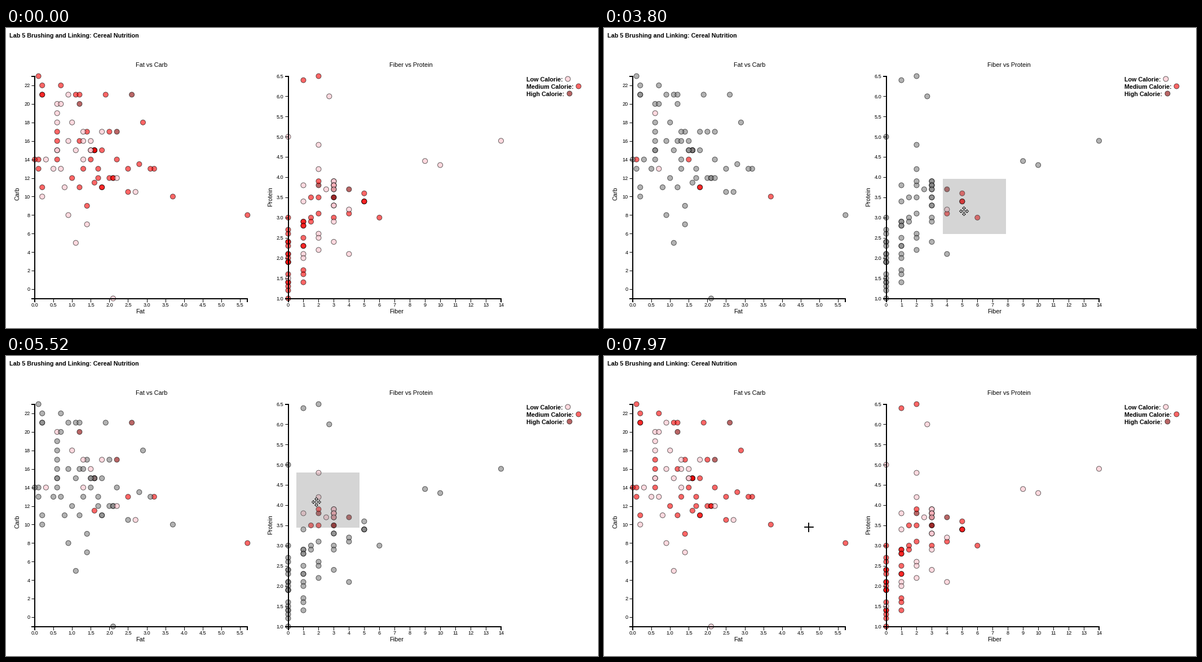
A matplotlib script for the animation above (8000 ms loop, 1050x533 px).

```python
import matplotlib.pyplot as plt
import numpy as np
from matplotlib.animation import FuncAnimation
from matplotlib.patches import Polygon, Rectangle

W, H, DPI = 1050, 533, 100
INTERVAL, LOOP = 40, 8000
PX = 72 / DPI
TOP, BOTTOM = 85.5, 480.5
LEFT_X = (51, 428.3)
RIGHT_X = (500.5, 878)

plt.rcParams["font.family"] = "Liberation Sans"

# fat, carb, fiber, protein
HIGH = [(2.6, 21, 2, 3.8), (1.2, 20, 3, 3.7), (2.2, 17, 3, 3.5),
        (1.6, 15, 4, 3.7), (1.6, 15, 3, 3.5)]
MEDIUM = [
    (2.5, 13, 2, 3.9), (3.2, 13, 1.5, 3.5), (1.6, 11.5, 2, 3.5), (5.7, 8, 3, 3.8),
    (.1, 14, 5, 3.6), (1.8, 11, 5, 3.4), (1.8, 11, 5, 3.4), (1.5, 14, 6, 3),
    (3.7, 10, 4, 3.1), (.6, 14, 2, 6.5), (2.2, 14, 1, 6.4), (2.8, 13.5, 3, 3),
    (.1, 13, 2, 3.1), (1.3, 13, 1.5, 3), (1.7, 13, 1.5, 2.9), (3.1, 13, 1, 2.9),
    (1, 12, 1, 2.9), (1.7, 12, 1, 2.8), (2, 12, 1, 2.8), (2.1, 12, 1, 2.5),
    (2.1, 12, 1, 2.3), (.2, 11, 1, 2.3), (1.2, 11, 1, 1.7), (2.5, 10.5, 1, 1.6),
    (1.4, 9, 1, 1.4),
]
# fat, carb, protein
NO_FIBER = [
    (.1, 23, 3), (.2, 22, 2.7), (.7, 22, 2.6), (.2, 21, 2.4), (.2, 21, 2.4),
    (1.1, 21, 2.3), (1.2, 21, 2.1), (1.9, 21, 2.1), (2.9, 18, 2), (.6, 17, 1.9),
    (1.4, 17, 1.9), (2, 17, 1.9), (.6, 16, 1.6), (1.2, 16, 1.4), (1.8, 15, 1.4),
    (1.6, 15, 1.3), (1.6, 15, 1.2), (0, 14, 1),
]
LOW = [
    (.7, 13, 5, 3.4), (1.3, 14, 2, 4.8), (2.2, 12, 2, 4.2), (.6, 20, 3, 3.9),
    (1, 18, 3, 3.9), (1.3, 17, 1, 3.8), (1.8, 17, 3, 3.8), (1.5, 16, 3, 3.8),
    (.3, 14, 2.5, 3.7), (2.7, 10.5, 3, 3.7), (.6, 19, 4, 3.2), (.9, 21, 2.7, 6),
    (.7, 20, 0, 5), (.6, 18, 14, 4.9), (.9, 16, 9, 4.4), (1.3, 16, 10, 4.3),
    (.6, 15, 1, 3.4), (.6, 15, 3, 3.3), (1.1, 15, 3, 3.3), (1.5, 15, 3, 2.9),
    (1.5, 15, 2, 2.6), (.5, 13, 2, 2.5), (.8, 11, 3, 2.4), (.2, 10, 2, 2.2),
    (.9, 8, 1, 2.1), (1.4, 7, 4, 2.1), (1.1, 5, 1, 2), (2.1, -1, 0, 1.5),
]
MEDIUM += [(f, c, 0, p) for f, c, p in NO_FIBER]

ALPHA = .6
PINK, RED, DARK, GRAY = [
    np.array([r, g, b, 255 * ALPHA]) / 255
    for r, g, b in [(255, 192, 203), (255, 0, 0), (139, 0, 0), (128, 128, 128)]]

cereals = np.array(LOW[:1] + HIGH + MEDIUM + LOW[1:])
colors = np.array([PINK] + [DARK] * len(HIGH) + [RED] * len(MEDIUM)
                  + [PINK] * (len(LOW) - 1))

# Moves: first step, last step, number of steps, end x, end y
MOUSE = [
    (200, 200, 1, 966, 508), (270, 540, 5, 737, 404), (870, 1260, 7, 713, 366),
    (1710, 2460, 12, 620, 281), (2530, 2670, 3, 611, 273), (2740, 3140, 7, 601, 268),
    (3530, 3800, 5, 638, 325), (4400, 4580, 4, 614, 306), (4655, 5180, 9, 573, 277),
    (5240, 5520, 5, 550, 259), (5590, 5940, 6, 552, 211), (6080, 6130, 2, 552, 207),
    (6200, 6450, 5, 551, 196), (6790, 7430, 11, 631, 230), (7830, 7970, 3, 362, 303),
]
BRUSH = [
    (1710, 2460, 12, 622, 283), (2530, 2670, 3, 613, 275), (2740, 3140, 7, 601, 267.5),
    (4400, 4580, 4, 583, 253), (4655, 5180, 9, 537, 222), (5240, 5520, 5, 515, 207),
    (5590, 5940, 6, 515, 156), (6080, 6130, 2, 515, 153), (6200, 6450, 5, 515, 141.5),
]
ANCHOR = np.array([712.5, 365.5])
BRUSH_SIZE = np.array([111.5, 98])
BRUSH_ON, BRUSH_DONE, GRAB, DRAG, CLEAR = 1710, 3140, 4130, 4400, 7500


def follow(path, start, t):
    pos = np.array(start, float)
    for t0, t1, n, x, y in path:
        if t < t0:
            break
        step = (t1 - t0) / max(n - 1, 1) or 1
        k = min(int((t - t0) / step) + 1, n)
        pos += (np.array([x, y]) - pos) * k / n
    return pos


def scale(v, domain, pixels):
    return pixels[0] + (v - domain[0]) / (domain[1] - domain[0]) * (pixels[1] - pixels[0])


fig = plt.figure(figsize=(W / DPI, H / DPI), dpi=DPI, facecolor="white")
ax = fig.add_axes([0, 0, 1, 1])
ax.set_xlim(0, W)
ax.set_ylim(H, 0)
ax.axis("off")


def label(x, y, s, size, ha="center", **kw):
    ax.text(x, y, s, fontsize=size * PX, ha=ha, va=kw.pop("va", "baseline"),
            zorder=3, **kw)


def line(xs, ys, width):
    ax.plot(xs, ys, color="black", lw=width * PX, zorder=3,
            solid_capstyle="butt", solid_joinstyle="miter")


def dots(x, y, fill):
    return ax.scatter(x, y, s=(9 * PX) ** 2, c=fill, edgecolors=(0, 0, 0, ALPHA),
                      linewidths=PX, zorder=2)


def chart(xs, ys, xr, xdom, ydom, xticks, yticks, xfmt, yfmt):
    x0, x1 = xr
    line([x0 - 6, x0, x0, x0 - 6], [TOP, TOP, BOTTOM, BOTTOM], 2)
    line([x0, x0, x1, x1], [BOTTOM + 6, BOTTOM, BOTTOM, BOTTOM + 6], 2)
    for v in xticks:
        x = scale(v, xdom, xr)
        line([x, x], [BOTTOM, BOTTOM + 6], 1)
        label(x, 495, format(v, xfmt), 9.2)
    for v in yticks:
        y = scale(v, ydom, (BOTTOM, TOP))
        line([x0 - 6, x0], [y, y], 1)
        label(x0 - 8.5, y + 3.3, format(v, yfmt), 9.2, ha="right")
    px, py = scale(xs, xdom, xr), scale(ys, ydom, (BOTTOM, TOP))
    return px, py, dots(px, py, colors)


fat, carb, fiber, protein = cereals.T
_, _, left = chart(fat, carb, LEFT_X, (0, 5.7), (-1, 23),
                   np.arange(0, 5.6, .5), range(0, 23, 2), ".1f", "d")
rx, ry, right = chart(fiber, protein, RIGHT_X, (0, 14), (1, 6.5),
                      range(15), np.arange(1, 6.6, .5), "d", ".1f")

label(6, 17, "Lab 5 Brushing and Linking: Cereal Nutrition", 10.75,
      ha="left", weight="bold")
label(258.5, 69, "Fat vs Carb", 10.9)
label(718, 69, "Fiber vs Protein", 10.9)
label(238, 507, "Fat", 10.9)
label(692.5, 507, "Fiber", 10.9)
label(20, 294.5, "Carb", 10.9, va="center", rotation=90)
label(469.5, 299.5, "Protein", 10.9, va="center", rotation=90)

for name, y, x, fill in [("Low", 95, 996, PINK), ("Medium", 108, 1015, RED),
                         ("High", 121, 998.5, DARK)]:
    label(923, y, name + " Calorie:", 10.7, ha="left", weight="bold")
    dots([x], [y - 5], [fill])


def spin(points):
    """Repeat points at four quarter turns."""
    p, out = np.array(points, float), []
    for _ in range(4):
        out.append(p)
        p = np.column_stack([-p[:, 1], p[:, 0]])
    return np.vstack(out)


def diagonal(points):
    x, y = np.array(points, float).T
    return np.column_stack([x - y, x + y]) * np.sqrt(.5)


CURSORS = {
    "cross": spin([(-.4, -.4), (-.4, -8), (.4, -8)]),
    "move": spin([(-1, -1), (-1, -5), (-3, -5), (0, -8), (3, -5), (1, -5)]),
    "resize": diagonal([(-9, 0), (-5, -4), (-5, -1), (5, -1), (5, -4),
                        (9, 0), (5, 4), (5, 1), (-5, 1), (-5, 4)]),
    "arrow": np.array([(0, 0), (0, 16), (4, 12.5), (6.5, 18), (9, 17),
                       (6.5, 11.5), (11.5, 11.5)]),
}

brush = Rectangle((0, 0), 0, 0, fc="#777777", alpha=.3, lw=0, zorder=4)
cursor = Polygon(CURSORS["cross"], closed=True, ec="black", lw=.9 * PX, zorder=6)
ax.add_patch(brush)
ax.add_patch(cursor)


def cursor_kind(mouse, corner, size, t):
    x, y = mouse
    if BRUSH_DONE <= t < CLEAR:
        if np.abs(mouse - corner).max() < 4:
            return "resize"
        if np.all((mouse >= corner) & (mouse <= corner + size)):
            return "move"
    over = any(a <= x <= b for a, b in (LEFT_X, RIGHT_X))
    return "cross" if over and TOP <= y <= BOTTOM else "arrow"


def draw(i):
    t = i * INTERVAL + 30
    mouse = follow(MOUSE, (966, 508), t)
    corner = follow(BRUSH, ANCHOR, t)
    size = BRUSH_SIZE if t >= DRAG else ANCHOR - corner
    active = BRUSH_ON <= t < CLEAR

    brush.set_visible(active)
    brush.set_bounds(*corner, *size)
    fill = colors
    if active and not GRAB <= t < DRAG:
        x, y = corner
        inside = (rx >= x) & (rx <= x + size[0]) & (ry >= y) & (ry <= y + size[1])
        fill = np.where(inside[:, None], colors, GRAY)
    left.set_facecolor(fill)
    right.set_facecolor(fill)

    kind = cursor_kind(mouse, corner, size, t)
    cursor.set_visible(t >= 200)
    cursor.set_xy(CURSORS[kind] + mouse + .5)
    cursor.set_facecolor("black" if kind == "cross" else "white")
    return left, right, brush, cursor


anim = FuncAnimation(fig, draw, frames=LOOP // INTERVAL, interval=INTERVAL,
                     repeat=True, repeat_delay=0)
plt.show()
```
